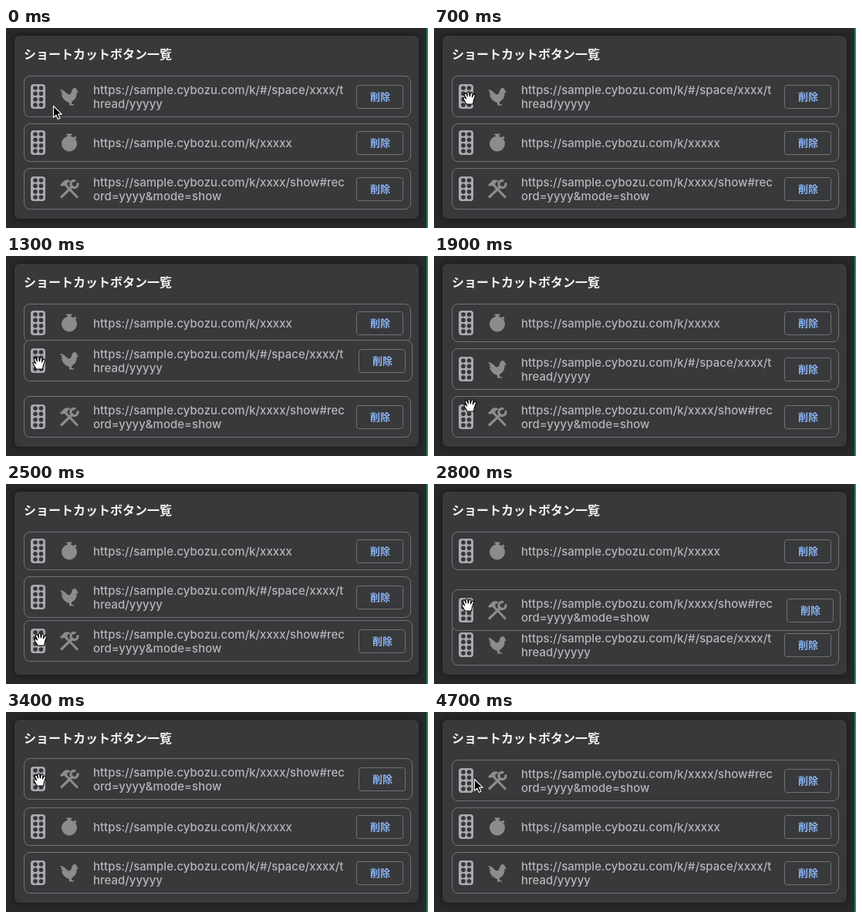
These frames come from a looping animation (547 by 260 pixels, 4800 ms). An HTML page:

```html
<!DOCTYPE html>
<html lang="ja">
<head>
<meta charset="utf-8">
<title>ショートカットボタン一覧</title>
<style>
  html, body { margin: 0; width: 100%; height: 100%; overflow: hidden; background: #28292b; }
  svg { display: block; }
  .card { fill: #38393b; filter: drop-shadow(0 0 5px rgba(0, 0, 0, .55)); }
  .title { font: 700 16px "Noto Sans CJK JP", "Noto Sans CJK", sans-serif; fill: #f1f2f3; }
  .url { font: 500 15px Inter, sans-serif; fill: #b3b5b8; }
  .frame { fill: #38393b; stroke: #707275; }
  .button rect { fill: none; stroke: #707275; }
  .button text { font: 700 13px "Noto Sans CJK JP", "Noto Sans CJK", sans-serif; fill: #8ab4f8; text-anchor: middle; }
  .handle { fill: #a9abae; }
  .dots { fill: #353638; }
  .icon { fill: #8b8c8d; stroke: #8b8c8d; stroke-width: 0; stroke-linecap: round; }
  .arrow { fill: #000; stroke: #fff; stroke-width: 1.1; stroke-linejoin: round; }
  .hand { fill: #fff; stroke: #000; stroke-width: 1.1; stroke-linejoin: round; }
</style>
</head>
<body>
<svg width="547" height="260" viewBox="0 0 547 260">
  <rect width="547" height="260" fill="#28292b"/>
  <rect class="card" x="11" y="10" width="524" height="238" rx="7"/>
  <rect x="545" width="2" height="260" fill="#0c9f4c"/>
  <text class="title" x="23" y="40">ショートカットボタン一覧</text>
  <g id="list"></g>
  <path id="arrow" class="arrow" d="M.5 .5V15.3L4 12.1L6.3 17.4L8.9 16.3L6.6 11.1H11.2Z"/>
  <path id="hand" class="hand" d="M-4 8C-5 5 -8 2 -8 .5C-8 -1.5 -5.5 -1 -4.3 1L-6.5 -4C-7 -6 -4.5 -7 -3.7 -5L-2.6 -2L-3 -6.5C-3 -8.5 -.5 -8.5 -.3 -6.5L.3 -2L1.3 -6C1.8 -8 4.2 -7.5 3.9 -5.5L3.3 -1L5 -4C6 -5.7 8 -4.5 7.3 -2.7L5.5 3C5 5 5 6 4.5 8Z"/>
</svg>
<script>
const LOOP = 4800, TICK = 100;
const list = document.getElementById('list');
const arrow = document.getElementById('arrow');
const hand = document.getElementById('hand');

const icons = {
  rooster: `<path d="M-12 -9C-8 -9 -5 -6 -2 -3C0 -2 2 -3 3 -6C3 -9 5 -11 7 -11C9 -11 10 -9 10 -8L12 -5H9.5C10 0 8 4 3 7V10H6V11.5H0V8C-5 7 -9 2 -10 -2H-8L-11 -5H-9Z"/>`,
  stopwatch: `<circle cy="1.5" r="10"/><path d="M-3.5 -11.5H3.5V-9.5H2V-7H-2V-9.5H-3.5ZM5.5 -6.5L7.5 -8.5L9.8 -6.2L8 -4.5Z"/>`,
  tools: `<path d="M-12 -5L-6 -11C-3 -12 -1 -12 2 -10L-2 -8L-3 -6L-2 -4L-4 -2L-6 -4H-8L-10 -3Z"/>
    <path d="M-3 -3L10 10.5M4 -3L-10 10.5" stroke-width="3.2"/>
    <path d="M7 -10.5A4.6 4.6 0 1 0 11 -6.5" fill="none" stroke-width="3.2"/>`
};

// Tracks: a starting value, then [begin, end, value] moves.
const rows = [
  { icon: 'rooster', lines: ['https://sample.cybozu.com/k/#/space/xxxx/t', 'hread/yyyyy'], drag: [900, 1500],
    track: [62, [850, 1400, 113.5], [1500, 1500, 120], [2560, 2800, 182]] },
  { icon: 'stopwatch', lines: ['https://sample.cybozu.com/k/xxxxx'], drag: [0, 0],
    track: [124, [1000, 1300, 62], [2950, 3200, 124]] },
  { icon: 'tools', lines: ['https://sample.cybozu.com/k/xxxx/show#rec', 'ord=yyyy&amp;mode=show'], drag: [2400, 3600],
    track: [182, [2380, 3400, 60], [3600, 3600, 62]] }
];
const cursorX = [61, [300, 700, 45], [850, 1300, 42], [1600, 1900, 46], [1900, 2100, 44], [2400, 2800, 43], [4400, 4700, 52]];
const cursorY = [101, [300, 700, 91], [850, 1400, 144], [1600, 1900, 192], [1850, 2100, 211], [2330, 3350, 88], [4400, 4700, 87]];

function valueAt([start, ...moves], t) {
  return moves.reduce((value, [begin, end, target]) => {
    const p = t >= end ? 1 : t <= begin ? 0 : (t - begin) / (end - begin);
    return value + (target - value) * p * p * (3 - 2 * p);
  }, start);
}

function buildRow(row) {
  row.height = row.lines.length > 1 ? 54 : 50;
  row.mid = row.height / 2;
  const baseline = row.lines.length > 1 ? 24 : 31;
  const text = row.lines.map((line, i) => `<text class="url" x="113" y="${baseline + 18 * i}">${line}</text>`).join('');
  const dots = [-11, -3.7, 3.7, 11].map(y => `<circle cx="38" cy="${y}" r="2.8"/><circle cx="45.5" cy="${y}" r="2.8"/>`).join('');
  row.node = document.createElementNS('http://www.w3.org/2000/svg', 'g');
  row.node.innerHTML = `
    <rect class="frame" x="23.5" y=".5" width="501" height="${row.height - 1}" rx="7.5"/>
    ${text}
    <g transform="translate(0 ${row.mid})">
      <rect class="handle" x="32" y="-16" width="19" height="32" rx="4"/>
      <g class="dots">${dots}</g>
      <g class="icon" transform="translate(82 0)">${icons[row.icon]}</g>
      <g class="button"><rect x="454.5" y="-14.5" width="60" height="30" rx="3"/><text x="485" y="5">削除</text></g>
    </g>`;
  row.frame = row.node.querySelector('.frame');
  row.button = row.node.querySelector('.button');
  list.append(row.node);
}

function moveTo(node, x, y) {
  node.setAttribute('transform', `translate(${x} ${y})`);
}

function draw(t) {
  const x = Math.round(valueAt(cursorX, t)), y = Math.round(valueAt(cursorY, t));
  let grab = false;
  for (const row of rows) {
    const top = Math.round(valueAt(row.track, t));
    const dragged = t >= row.drag[0] && t < row.drag[1];
    moveTo(row.node, 0, top);
    row.frame.setAttribute('width', dragged ? 503 : 501);
    moveTo(row.button, dragged ? 3 : 0, 0);
    if (dragged && list.lastChild !== row.node) list.append(row.node);
    grab ||= dragged || (x < 52 && Math.abs(y - top - row.mid) < 18);
  }
  moveTo(arrow, x, y);
  moveTo(hand, x + 1, y);
  arrow.style.display = grab ? 'none' : '';
  hand.style.display = grab ? '' : 'none';
}

function frame() {
  const t = performance.now() % LOOP;
  draw(Math.floor(t / TICK) * TICK);
  requestAnimationFrame(frame);
}

rows.forEach(buildRow);
frame();
</script>
</body>
</html>
```
